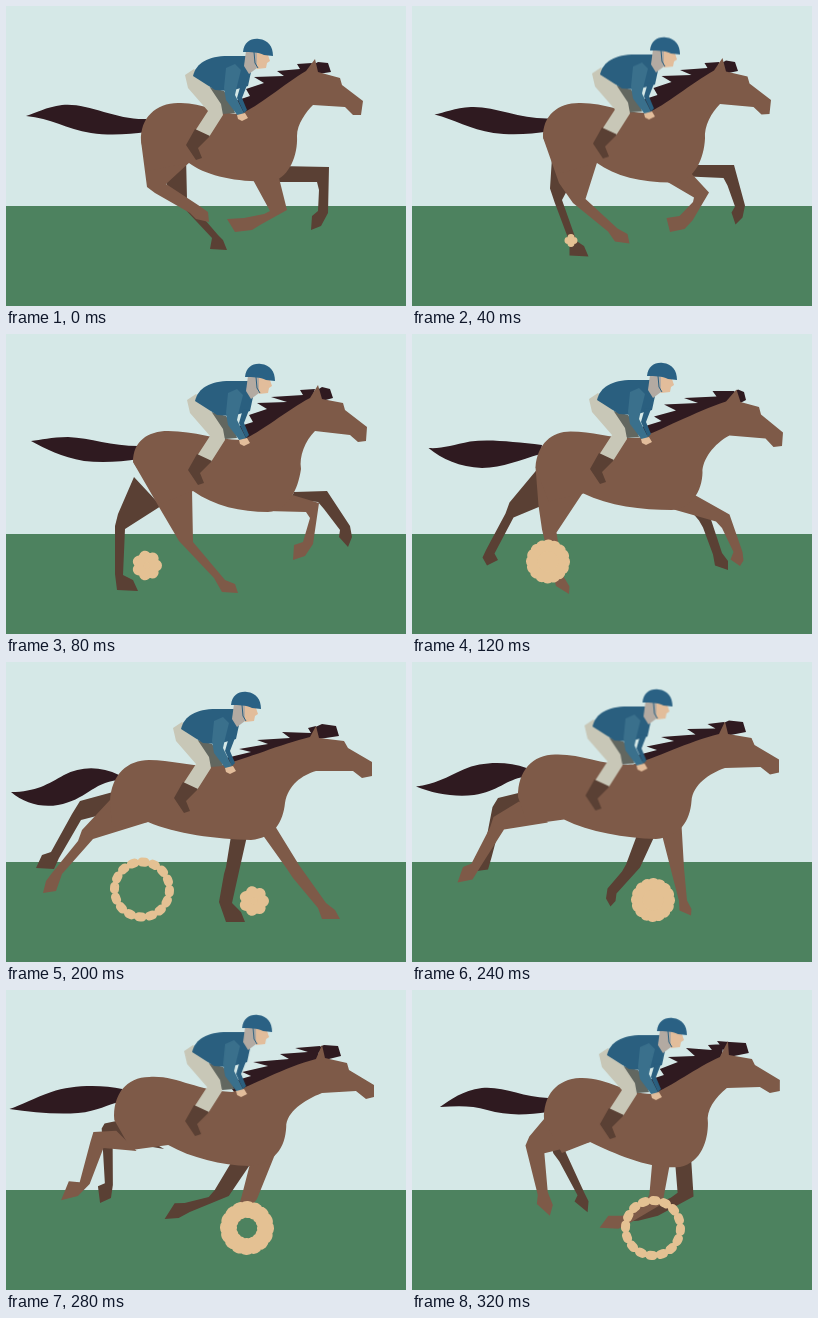
Animation of 400 by 300 pixels, one loop 0.36 s. Source, as an HTML page without scripts:

```html
<!DOCTYPE html>
<html lang="en">
<head>
<meta charset="utf-8">
<title>Galloping horse</title>
<style>
html, body { margin: 0; width: 100%; height: 100%; overflow: hidden; background: #d5e8e7; }
svg { display: block; width: 100%; height: 100%; }

/* Poses are drawn on twos: steps(2) fills the halfway pose, --hold keeps a single one. */
:root { --hold: step-end; --coat: #7e5a48; --shade: #5a4034; --hair: #2f1a20; --sand: #e4c193; }
.move { animation: 360ms steps(2) infinite; }
.coat { fill: var(--coat); }
.shade { fill: var(--shade); }
.hair { fill: var(--hair); }

#tail { animation-name: tail; }
#mane { animation-name: mane; }
#body { animation-name: body; }
#nearHind { animation-name: nearHind; }
#farHind { animation-name: farHind; }
#nearFore { animation-name: nearFore; }
#farFore { animation-name: farFore; }
#rider { animation-name: rider; }

@keyframes tail {
  0%, 100% { d: path("M140 113C110 114 80 96 56 99C40 101 30 107 20 110C45 112 60 123 85 127C105 130 125 128 140 126Z"); }
  22.222% { d: path("M133 112C105 112 85 104 62 103C45 103 35 106 25 107C40 115 55 123 78 127C95 129 115 128 133 125Z"); }
  44.444% { animation-timing-function: var(--hold); d: path("M127 110C100 104 72 106 54 112C37 119 24 124 8 121C20 135 40 143 62 141C88 138 100 124 124 115Z"); }
  55.555% { d: path("M113 113C95 104 75 104 58 113C42 122 30 130 5 130C18 141 35 146 52 143C80 138 86 121 112 118Z"); }
  77.777% { animation-timing-function: var(--hold); d: path("M116 99C95 94 65 95 45 102C28 108 15 115 3 119C25 122 50 125 72 123C92 121 102 114 112 112Z"); }
  88.888% { animation-timing-function: var(--hold); d: path("M136 108C110 107 92 96 70 98C50 101 40 109 28 117C45 116 60 115 75 120C95 126 115 125 136 122Z"); }
}
@keyframes mane {
  0%, 100% { d: path("M240 112L226 96 244 90 240 83 258 77 248 71 278 70 271 65 294 63 291 58 306 57 300 72ZM305 60L312 56 322 57 325 66 312 68Z"); }
  22.222% { d: path("M243 110L228 94 247 88 243 81 261 75 251 69 281 68 265 63 297 61 294 56 309 55 304 70ZM308 58L316 53 324 55 327 64 316 67Z"); }
  44.444% { animation-timing-function: var(--hold); d: path("M232 108L226 94 252 86 241 84 267 78 253 72 291 70 279 65 312 64 307 58 336 59 324 76ZM330 62L336 58 340 61 341 68 335 74Z"); }
  55.555% { d: path("M226 108L220 96 245 90 233 87 262 82 251 78 284 76 276 70 305 71 302 66 310 64 306 78ZM305 67L316 62 330 64 333 74 313 77Z"); }
  77.777% { animation-timing-function: var(--hold); d: path("M232 107L221 93 245 86 236 82 262 76 247 72 283 69 274 64 302 62 289 58 314 56 311 73ZM311 58L318 55 332 56 335 66 319 70Z"); }
  88.888% { animation-timing-function: var(--hold); d: path("M248 107L234 91 252 85 248 79 266 72 256 67 283 66 274 58 300 60 296 55 312 54 309 69ZM305 51L318 52 334 53 337 63 317 67Z"); }
}
@keyframes body {
  0%, 100% { d: path("M135 135C134 112 150 97 172 97C196 96 212 108 234 108C252 101 278 78 300 65L309 53 312 66 334 72 336 79 357 95 355 109 347 109 339 101 307 99C300 106 291 118 291 130C292 150 283 170 268 175C232 177 200 170 183 157L142 165Z"); }
  22.222% { d: path("M127 128C127 107 142 97 162 97C190 97 208 106 236 106C254 99 281 76 304 64L312 51 316 65 337 69 339 76 361 93 360 107 352 108 344 101 309 97C299 107 293 122 295 135C292 155 283 176 262 178C235 178 208 172 187 157L155 170Z"); }
  44.444% { animation-timing-function: var(--hold); d: path("M120 138C124 112 138 98 155 98C178 98 196 106 222 101C242 94 285 80 324 71L337 60 341 71 357 77 359 85 381 104 380 117 371 118 363 108 326 106C305 112 287 130 286 142C288 160 275 174 258 174C225 174 185 172 156 162L118 165Z"); }
  55.555% { d: path("M104 140C105 112 122 98 143 98C170 98 190 107 216 103C240 97 275 82 304 75L310 64 313 76 338 79 342 86 366 100 366 114 356 116 347 109 310 109C296 113 282 123 279 141C277 160 268 176 245 178C210 177 170 172 142 160L106 165Z"); }
  77.777% { animation-timing-function: var(--hold); d: path("M108 130C106 105 120 87 143 87C170 85 190 101 226 102C246 96 278 77 310 69L316 55 319 68 341 73 343 80 368 95 368 107 360 109 350 101 316 103C298 110 280 122 280 137C279 158 268 174 243 176C215 175 185 168 162 155L125 160Z"); }
  88.888% { animation-timing-function: var(--hold); d: path("M132 130C131 105 145 89 168 88C195 87 213 104 240 104C259 97 285 77 308 67L316 51 317 65 340 69 343 75 368 90 368 101 358 103 348 97 315 98C303 108 294 120 296 133C296 150 290 172 268 177C240 180 205 165 178 152L150 163Z"); }
}

/* Legs: top, knee, fetlock, hoof, and back up the other side. */
@keyframes nearHind {
  0%, 100% { d: path("M135 135L141 181 149 187 184 207 190 213 203 216 202 206 192 199 160 178 185 155Z"); }
  22.222% { d: path("M127 128L153 173 173 207 208 244 216 258 232 259 229 250 219 246 187 208 186 155Z"); }
  44.444% { animation-timing-function: var(--hold); d: path("M120 138L100 170 87 184 74 238 72 246 82 261 86 255 84 239 102 189 156 162Z"); }
  55.555% { d: path("M104 138L76 168 72 179 46 211 40 219 37 231 50 229 56 212 87 177 142 160Z"); }
  77.777% { animation-timing-function: var(--hold); d: path("M110 141L87 142 84 152 73 192 62 191 54 210 71 206 83 194 97 158 130 161Z"); }
  88.888% { animation-timing-function: var(--hold); d: path("M132 129L117 146 113 155 125 205 124 214 137 226 140 215 135 202 132 163 178 152Z"); }
}
@keyframes farHind {
  0%, 100% { d: path("M152 160L164 185 176 200 206 232 204 243 221 244 217 234 212 229 181 193 180 150Z"); }
  22.222% { d: path("M128 143L112 180 109 192 109 240 111 256 132 257 127 246 117 241 119 195 155 172Z"); }
  44.444% { animation-timing-function: var(--hold); d: path("M122 128L83 157 78 167 39 192 30 191 18 206 45 206 48 198 84 172 108 170Z"); }
  55.555% { d: path("M107 130L74 139 66 152 45 190 36 193 30 206 48 207 53 196 75 158 106 150Z"); }
  77.777% { animation-timing-function: var(--hold); d: path("M110 131L98 133 95 138 98 193 91 196 93 213 104 208 106 195 106 150 158 159Z"); }
  88.888% { animation-timing-function: var(--hold); d: path("M135 140L141 163 147 171 165 205 162 211 175 222 176 211 172 203 153 161 165 150Z"); }
}
@keyframes nearFore {
  0%, 100% { d: path("M246 172L264 205 258 208 238 212 221 213 229 226 246 224 254 219 281 204 273 172Z"); }
  22.222% { d: path("M260 177L300 178 304 184 297 208 288 211 287 226 299 222 307 210 313 169 283 160Z"); }
  44.444% { animation-timing-function: var(--hold); d: path("M260 173L308 197 316 204 346 228 349 240 369 238 364 231 354 226 322 192 279 160Z"); }
  55.555% { d: path("M256 172L281 207 287 216 312 246 316 257 334 257 329 248 320 241 293 203 269 164Z"); }
  77.777% { animation-timing-function: var(--hold); d: path("M244 174L236 205 234 212 222 232 219 240 224 250 230 246 230 236 251 209 270 162Z"); }
  88.888% { animation-timing-function: var(--hold); d: path("M240 174L237 205 232 213 210 226 196 226 187 238 206 239 216 234 250 214 258 172Z"); }
}
@keyframes farFore {
  0%, 100% { d: path("M270 176L311 176 313 184 312 205 306 210 305 224 315 220 322 207 323 161 272 160Z"); }
  22.222% { d: path("M285 165L312 168 318 175 334 196 333 203 342 213 346 203 344 192 321 157 288 158Z"); }
  44.444% { animation-timing-function: var(--hold); d: path("M257 170L262 205 264 212 268 245 273 260 290 259 286 251 276 246 274 205 274 168Z"); }
  55.555% { d: path("M225 174L220 205 218 212 213 240 220 260 239 260 235 250 226 241 234 205 241 174Z"); }
  77.777% { animation-timing-function: var(--hold); d: path("M225 172L208 200 202 207 178 213 168 213 158 229 172 228 183 222 222 206 244 174Z"); }
  88.888% { animation-timing-function: var(--hold); d: path("M263 172L265 203 258 208 226 222 216 224 205 232 225 231 245 226 281 207 279 165Z"); }
}
@keyframes rider {
  0%, 100% { transform: translate(0, 0); }
  22.222% { transform: translate(2px, -3px); }
  44.444% { animation-timing-function: var(--hold); transform: translate(-6px, -5px); }
  55.555% { transform: translate(-12px, -3px); }
  77.777% { animation-timing-function: var(--hold); transform: translate(-1px, -8px); }
  88.888% { animation-timing-function: var(--hold); transform: translate(8px, -5px); }
}

/* Dust: a ring of round dashes that opens up, then vanishes. */
.dust { fill: none; stroke: var(--sand); stroke-linecap: round; animation: puff 360ms step-end infinite; }
.hind { --r: 22.5px; --w: 10.5px; --x: 5px; --y: 4px; animation-delay: -320ms; }
.fore { --r: 18.5px; --w: 17px; --x: 7px; --y: 1px; animation-delay: -200ms; }
@keyframes puff {
  0% { r: 3px; stroke-width: 7px; stroke-dasharray: .01 4; fill: var(--sand); transform: translate(23px, 7px); }
  11.111% { r: 9px; stroke-width: 12px; stroke-dasharray: .01 2.2757; fill: var(--sand); transform: translate(var(--x), var(--y)); }
  22.222% { r: 16px; stroke-width: 12px; stroke-dasharray: .1 .9; fill: var(--sand); transform: none; }
  33.333% { r: var(--r); stroke-width: var(--w); stroke-dasharray: .1 .9; fill: none; transform: none; }
  44.444% { r: 27.5px; stroke-width: 9px; stroke-dasharray: .3 .7; fill: none; transform: none; visibility: visible; }
  55.555%, 100% { visibility: hidden; }
}
</style>
</head>
<body>
<svg viewBox="0 0 400 300">
  <path fill="#d5e8e7" d="M0 0H400V200H0Z"/>
  <path fill="#4d825f" d="M0 200H400V300H0Z"/>

  <path id="tail" class="move hair"/>
  <path id="farHind" class="move shade"/>
  <path id="farFore" class="move shade"/>
  <path id="mane" class="move hair"/>
  <path id="nearHind" class="move coat"/>
  <path id="nearFore" class="move coat"/>
  <path id="body" class="move coat"/>

  <g id="rider" class="move">
    <path fill="#626760" d="M200 80L218 85 226 97 229 107 217 108 204 92Z"/>
    <path fill="#c8c7b7" d="M188 63L179 69 182 82 202 105 189 125 203 131 217 109 215 98 203 80Z"/>
    <path class="shade" d="M189 123L204 130 192 142 196 152 190 154 180 139Z"/>
    <path fill="#2a5f7f" d="M187 70C190 57 202 50 222 50L240 50 245 66 242 80 224 85 209 84Z"/>
    <path fill="#3a708c" d="M220 62L229 58 235 64 231 80 229 89 238 107 232 110 220 94 218 82Z"/>
    <path fill="#2a5f7f" d="M235 78L231 92 238 107 241 104 236 92 241 79Z"/>
    <path fill="#e2bd9b" d="M231 109L239 107 242 112 236 115 232 113ZM249 46H261L264 55 261 57 260 62 251 63Z"/>
    <path fill="#b3aaa2" d="M240 45H251V62L243 68 238 60Z"/>
    <path fill="none" stroke="#2a5f7f" d="M248 46L249 57 252 62"/>
    <path fill="#2a6184" d="M237 46C238 36 245 32 253 33C262 34 267 40 267 50L258 49C252 46 245 46 237 46Z"/>
  </g>

  <circle class="dust hind" cx="136" cy="227.5" r="0" pathLength="16"/>
  <circle class="dust fore" cx="241" cy="238" r="0" pathLength="16"/>
</svg>
</body>
</html>
```
